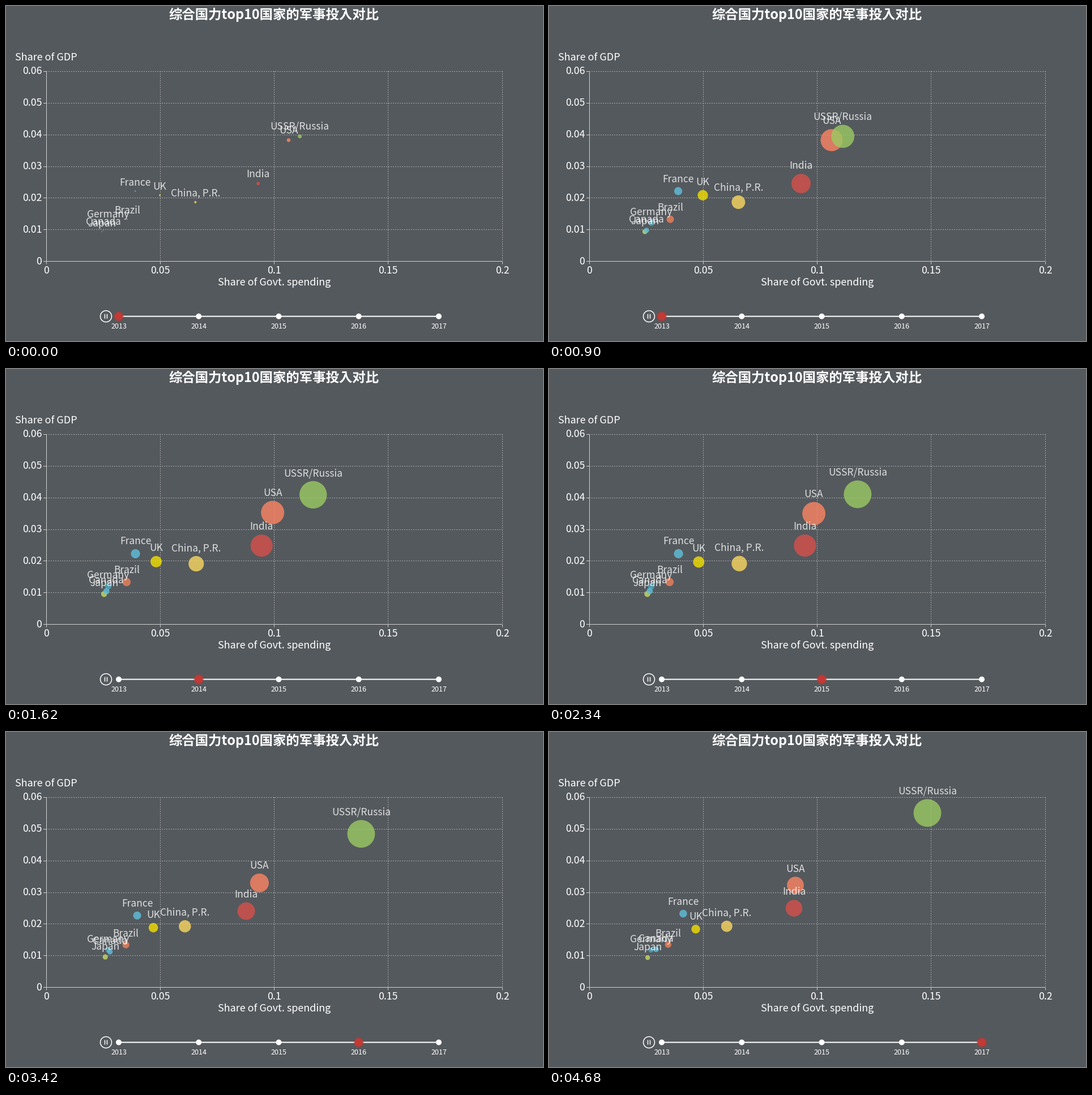
A matplotlib script for the animation above (5.04 s loop, 948 px wide and 591 px high).

```python
import matplotlib.pyplot as plt
import numpy as np
from matplotlib.animation import FuncAnimation
from matplotlib.patches import Circle

W, H, DPI = 948, 591, 96
STEP, FRAMES = 180, 28
PX = 72 / DPI
BG = "#54595d"

LEFT, RIGHT, TOP, BOTTOM = 71, 876, 115.5, 450.5
X_UNIT = (RIGHT - LEFT) / 20     # pixels per percent of spending
Y_UNIT = (BOTTOM - TOP) / 6      # pixels per percent of GDP
MAX_RADIUS = 24.4
AXIS_Y = 547.5

# colour and key points in percent, spread evenly over the data years
COUNTRIES = {
    "USA": ("#fe8463", [(10.62, 3.83), (9.84, 3.50), (9.34, 3.30), (9.03, 3.23)]),
    "USSR/Russia": ("#9bca63", [(11.11, 3.95), (11.76, 4.11), (13.8, 4.85),
                                (14.82, 5.51)]),
    "China, P.R.": ("#fad860", [(6.53, 1.87), (6.57, 1.92), (6.07, 1.93),
                                (6.02, 1.93)]),
    "India": ("#d7504b", [(9.28, 2.46), (9.45, 2.49), (8.76, 2.41), (8.97, 2.5)]),
    "Japan": ("#c6dc66", [(2.43, 0.94), (2.59, 0.97), (2.55, 0.94)]),
    "UK": ("#f4e001", [(4.97, 2.09), (4.70, 1.91), (4.66, 1.84)]),
    "Germany": ("#4fa9bd", [(2.71, 1.21), (2.70, 1.18)]),
    "France": ("#60c0dd", [(3.89, 2.22), (3.91, 2.24), (4.11, 2.33)]),
    "Brazil": ("#f0805a", [(3.54, 1.33), (3.45, 1.35)]),
    "Canada": ("#60c0dd", [(2.50, 0.98), (2.92, 1.20)]),
}
MOVES = [1620, 2700, 3960]
MARKER_JUMPS = [1260, 2160, 3420, 4680]

plt.rcParams["font.family"] = ["Noto Sans CJK JP", "DejaVu Sans"]
plt.rcParams["toolbar"] = "None"

fig = plt.figure(figsize=(W / DPI, H / DPI), dpi=DPI, facecolor=BG)
ax = fig.add_axes([0, 0, 1, 1])
ax.set_xlim(0, W)
ax.set_ylim(H, 0)
ax.axis("off")


def text(x, y, s, size, ha="center", **kw):
    return ax.text(x, y, s, fontsize=size * PX, ha=ha, va="baseline",
                   color="white", **kw)


def line(x0, y0, x1, y1, color="#d0d0d0", width=1, **kw):
    ax.plot([x0, x1], [y0, y1], color=color, lw=width * PX, snap=False,
            solid_capstyle="butt", **kw)


def disc(x, y, r, color, **kw):
    return ax.add_patch(Circle((x, y), r, fc=color, **kw))


def pixel(v):
    """Centre of the pixel nearest to v."""
    return np.floor(v) + 0.5


def year_x(k):
    return 199 + 141.25 * k


def draw_chart():
    text(473.5, 23.3, "综合国力top10国家的军事投入对比", 23.4, weight="bold")
    text(16, 96.5, "Share of GDP", 18, ha="left")
    text(473.5, 493, "Share of Govt. spending", 18)
    grid = dict(color="#aaaaaa", linestyle=(0, (2, 2)), zorder=1)
    for k in range(7):
        y = pixel(BOTTOM - k * Y_UNIT)
        if k:
            line(LEFT, y, RIGHT, y, **grid)
        line(LEFT - 5, y, LEFT, y, zorder=2)
        text(63.5, y + 5, f"{k / 100:g}", 17.8, ha="right")
    for k in range(5):
        x = pixel(LEFT + 5 * k * X_UNIT)
        if k:
            line(x, TOP - 0.5, x, BOTTOM, **grid)
        line(x, BOTTOM, x, BOTTOM + 5, zorder=2)
        text(x - 0.5, 471.7, f"{k / 20:g}", 17.8)
    line(LEFT + 0.5, TOP, LEFT + 0.5, BOTTOM, zorder=2)
    line(LEFT, BOTTOM, RIGHT, BOTTOM, zorder=2)


def draw_timeline():
    line(year_x(0), AXIS_Y, year_x(4), AXIS_Y, "white", 2, zorder=2)
    for k in range(5):
        disc(year_x(k), AXIS_Y, 5, "white", ec="none", zorder=3)
        text(year_x(k), 568.7, str(2013 + k), 12.5)
    disc(176.5, AXIS_Y, 10, "none", ec="white", lw=1.5 * PX, zorder=3)
    for x in (174.5, 178.5):
        line(x, AXIS_Y - 4, x, AXIS_Y + 4, "white", 1.5, zorder=3)


draw_chart()
draw_timeline()
halo = disc(0, AXIS_Y, 9, "#c23531", ec="none", alpha=0.5, zorder=4)
core = disc(0, AXIS_Y, 7, "#c23a35", ec="none", zorder=5)
bubbles = [disc(0, 0, 1, color, ec="none", alpha=0.8, zorder=6)
           for color, _ in COUNTRIES.values()]
labels = [text(0, 0, name, 17.4, alpha=0.8, zorder=7) for name in COUNTRIES]


def spread(points):
    """Resample key points to one (x, y) per data year."""
    at = np.linspace(0, 1, len(MOVES) + 1)
    keys = np.linspace(0, 1, len(points))
    return np.column_stack([np.interp(at, keys, c) for c in zip(*points)])


# shares[country, year] -> states[country, year] as x, y, radius in pixels
shares = np.array([spread(points) for _, points in COUNTRIES.values()])
spending, gdp = shares[..., 0], shares[..., 1]
states = np.stack([LEFT + 0.5 + spending * X_UNIT,
                   BOTTOM - gdp * Y_UNIT,
                   MAX_RADIUS * spending / spending.max(axis=0)], axis=-1)


def growth(i):
    """Opening scale: quick at first, then a long slow tail."""
    return 1 - 0.857 / (1 + 0.42 * i ** 1.43)


def poses(i):
    now = states[:, 0] * [1, 1, growth(i)]
    for k, start in enumerate(MOVES, 1):
        steps = max(0, i - start // STEP + 1)
        now = now + (states[:, k] - now) * (1 - 0.1 ** steps)
    return now


def update(i):
    for bubble, label, (x, y, r) in zip(bubbles, labels, poses(i)):
        bubble.set_center((x, y))
        bubble.set_radius(r)
        label.set_position((x, y - r - 8.7))
    x = year_x(sum(i * STEP >= jump for jump in MARKER_JUMPS))
    halo.set_center((x, AXIS_Y))
    core.set_center((x, AXIS_Y))
    return [*bubbles, *labels, halo, core]


anim = FuncAnimation(fig, update, frames=FRAMES, interval=STEP,
                     init_func=lambda: update(0), repeat=True,
                     repeat_delay=0, blit=False)
plt.show()
```
